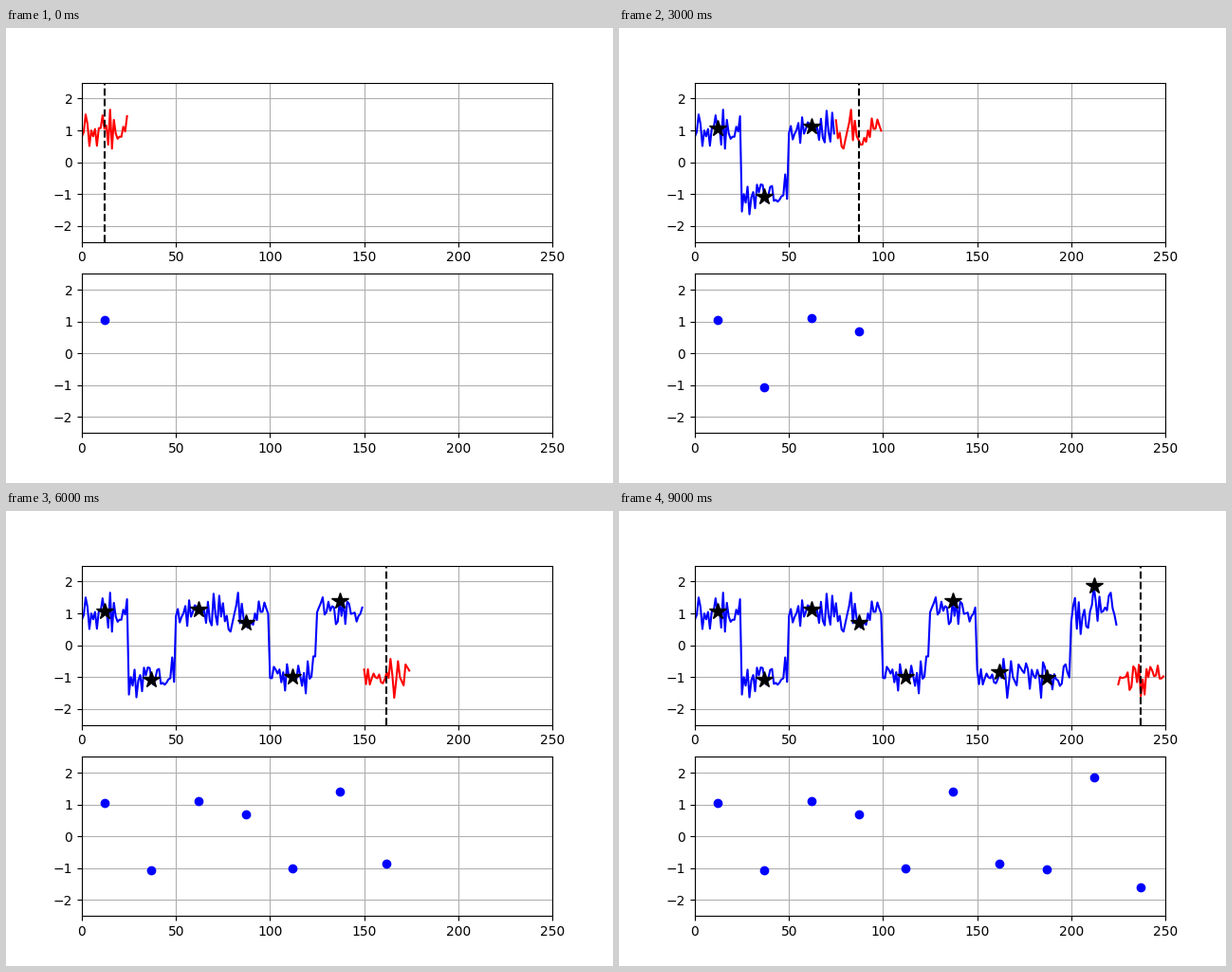
These frames come from a looping animation (640 by 480 pixels, 10 s). A matplotlib script:

```python
import numpy as np
import matplotlib.pyplot as plt
from matplotlib.animation import FuncAnimation

LENGTH = 25        # samples per symbol
MID = LENGTH // 2  # sampling instant inside a symbol
NOISE = 0.3

# Received level at each sampling instant; its sign is the sent symbol.
samples = np.array([1.05, -1.08, 1.12, 0.7, -1, 1.4, -0.85, -1.03, 1.85, -1.6])
count = samples.size

rng = np.random.default_rng(4)
time = np.arange(count * LENGTH)
instants = time[MID::LENGTH]
noise = np.clip(rng.normal(0, NOISE, time.size), -0.65, 0.65)
signal = np.repeat(np.sign(samples), LENGTH) + noise
signal[instants] = samples

fig, (top, bottom) = plt.subplots(2, 1, figsize=(6.4, 4.8), dpi=100)
for ax in (top, bottom):
    ax.set_xlim(0, time.size)
    ax.set_ylim(-2.5, 2.5)
    ax.set_yticks(range(-2, 3))
    ax.grid(True)

past, = top.plot([], [], "b")
current, = top.plot([], [], "r")
stars, = top.plot([], [], "k*", markersize=13)
cursor = top.axvline(MID, color="k", linestyle="--")
dots, = bottom.plot([], [], "bo")


def update(k):
    start, end = k * LENGTH, (k + 1) * LENGTH
    past.set_data(time[:start], signal[:start])
    current.set_data(time[start:end], signal[start:end])
    stars.set_data(instants[:k], samples[:k])
    cursor.set_xdata([instants[k]] * 2)
    dots.set_data(instants[:k + 1], samples[:k + 1])
    return past, current, stars, cursor, dots


anim = FuncAnimation(fig, update, frames=count, interval=1000,
                     repeat=True, repeat_delay=0)
plt.show()
```
